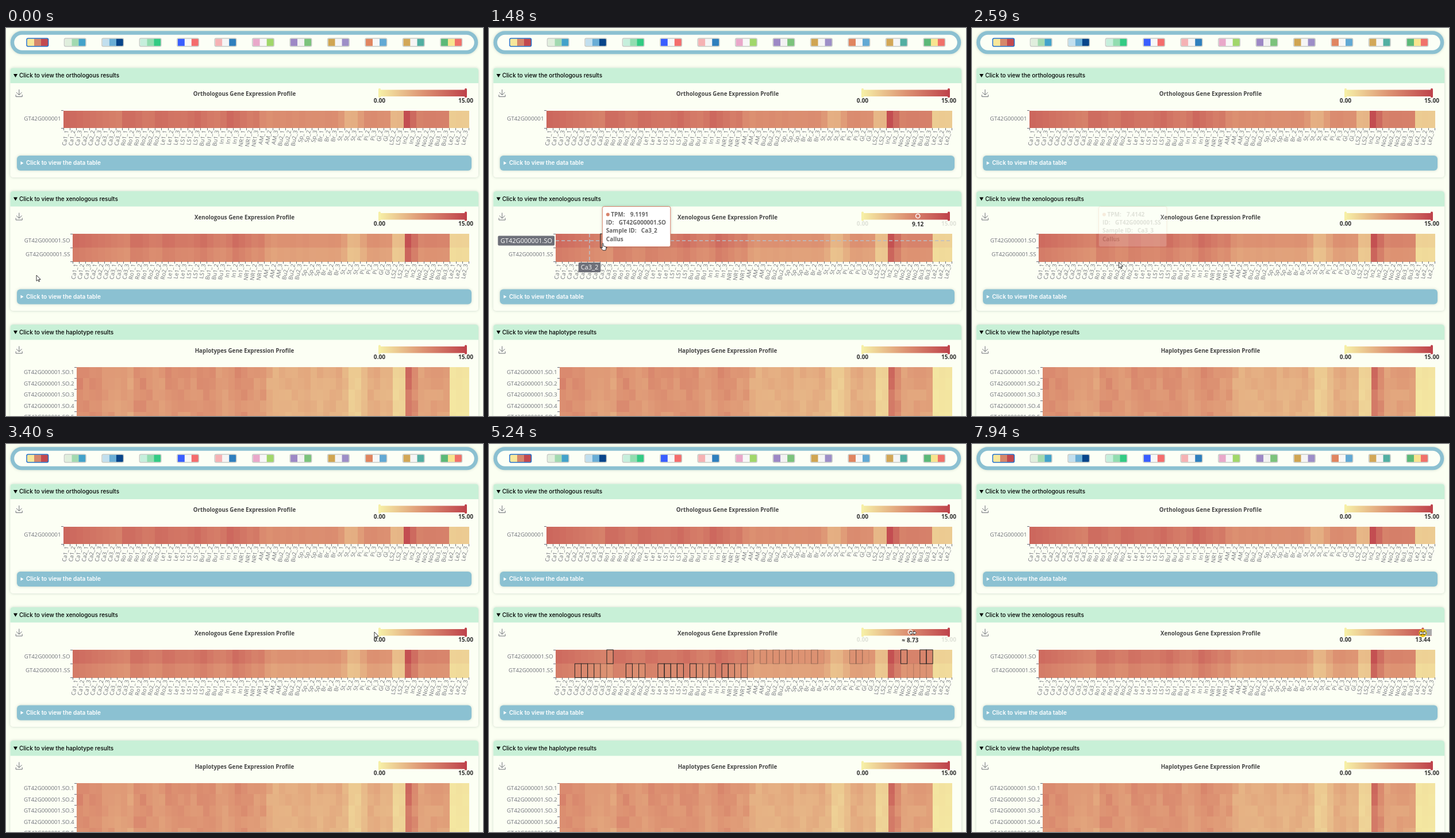
An HTML page that plays this animation: 830 px wide and 675 px high, repeating every 8 s.

```html
<!DOCTYPE html>
<html lang="en">
<head>
<meta charset="utf-8">
<title>Gene expression profiles</title>
<style>
  html, body { margin: 0; width: 100%; height: 100%; overflow: hidden; background: #fbfff2; }
  svg { display: block; width: 100%; height: 100%; }
  text { font-family: "Open Sans", "Noto Sans", sans-serif; white-space: pre; }
  .head { font: 500 10px Inter, sans-serif; fill: #000; }
  .bar { font: 600 10px Inter, sans-serif; fill: #fff; }
  .title { font-size: 9.8px; font-weight: 700; fill: #464646; text-anchor: middle; }
  .axis { font-size: 9.75px; fill: #6e7079; text-anchor: end; }
  .scale { font-size: 10.2px; font-weight: 700; fill: #333; text-anchor: middle; }
  .tag { font-size: 11px; fill: #fff; }
  .tip { font-size: 10px; font-weight: 700; fill: #666; }
  .tick { stroke: #6e7079; stroke-width: 1; fill: none; }
  .crisp { shape-rendering: crispEdges; }
</style>
</head>
<body>
<svg viewBox="0 0 830 675" xmlns="http://www.w3.org/2000/svg">
  <defs>
    <linearGradient id="ramp">
      <stop offset="0" stop-color="#f6efa6"/><stop offset=".5" stop-color="#dd9373"/><stop offset="1" stop-color="#bf444c"/>
    </linearGradient>
    <filter id="soft" x="-10%" y="-30%" width="120%" height="160%">
      <feDropShadow dx="0" dy="0" stdDeviation="2.2" flood-color="#576" flood-opacity=".32"/>
    </filter>
  </defs>
  <g id="page"></g>
  <g id="live"></g>
</svg>
<script>
const LOOP = 8000, RIGHT = 805.5, MAX = 15, BAR0 = 650, BARW = 150;

// tissue names with their replicate numbers
const samples = [
  'Ca1 Ca2 Ca3 Ro1 Ro2 Le1 LS1 Bu1 In1 NR1 AM Bu2 Sp Br St Pi:123', 'Gl:23', 'LS2:23', 'In2:13', 'No2:123', 'Bu3:13', 'Le2:123'
].flatMap(s => {
  const [names, reps] = s.split(':');
  return names.split(' ').flatMap(n => [...reps].map(r => n + '_' + r));
});
const COLS = samples.length;

const noise = (r, c) => { const v = Math.sin(r * 78.23 + c * 12.99) * 43758.5; return v - Math.floor(v) - .5; };

// expression model: falling callus, rippled roots and leaves, a stem dip, then one level per late tissue
function level(c) {
  if (c < 30) return 10.2 + .035 * c * Math.cos((c - 20) * 1.19);
  if (c < 50) return 7.6 - 3.35 * Math.exp(-((c - 43.5) ** 2) / 2);
  return { LS2: 4.2, In2: 13.3 - 1.9 * (c - 52), No2: 9, Bu3: 9, Le2: 2.4 }[samples[c].slice(0, 3)];
}
const tpm = samples.map((_, c) => c < 9 ? 11.3143 - .3136 * c : level(c) * (1 + noise(0, c) * .08));
const ortho = [tpm.map(v => v * .98 + .6)];
const xeno = [tpm, tpm.map(v => v * .9 - .51075)];
const haplo = [1, 2, 3, 4, 5].map(r => tpm.map((v, c) => v * (.89 - .015 * r + noise(r, c) * .14) - 1.2));

const mix = (a, b, t) => a.map((v, i) => Math.round(v + (b[i] - v) * t));
const stops = [[246, 239, 166], [221, 147, 115], [191, 68, 76]];
const heat = v => {
  const t = clamp(v / MAX, 0, 1) * 2;
  return `rgb(${t < 1 ? mix(stops[0], stops[1], t) : mix(stops[1], stops[2], t - 1)})`;
};

const rect = (x, y, w, h, fill, more = '') => `<rect x="${x}" y="${y}" width="${w}" height="${h}" fill="${fill}" ${more}/>`;
const text = (cls, x, y, s, more = '') => `<text class="${cls}" x="${x}" y="${y}" ${more}>${s}</text>`;
const handle = (x, y, v) => rect(x - 2, y - 8, 4, 16, heat(v), 'rx="1.5"');
function clamp(v, a, b) { return Math.max(a, Math.min(b, v)); }

function paletteBar() {
  const sets = [
    'f8e79b d6876b c2494f', 'e0eedd a2d9b0 43a2ca', 'c2dfee 6aaed6 08458a', 'c6efdc 92ddb0 33cb83',
    '3a5eff f7f7f7 f46d6d', 'f5b2b4 f5f5f5 2f7fbe', 'e9a8ca f7f7f7 a1d76a', '9d88c5 f2f2f2 7cc37c',
    'd0a552 f5f5f5 9d8ec7', 'e08560 f7f7f7 62a9d4', 'd2a757 f5f5f5 52afa2', '5cb978 f8e48f f0716a'
  ];
  return rect(11, 8.5, 807, 33.5, '#fcfff6', 'rx="16.7" stroke="#8bc0d1" stroke-width="6.5" filter="url(#soft)"') +
    sets.map((s, i) => {
      const x = 36 + i * 65.45;
      return s.split(' ').map((c, k) => rect(x + 1 + k * 12, 18.5, 12.2, 13, '#' + c)).join('') +
        rect(x, 18, 37.6, 14, 'none', `rx="2.5" stroke-width="1.5" stroke="${i ? '#c8ccc8' : '#2470c8'}"`);
    }).join('');
}

function card(y, height, kind, title) {
  return rect(7.5, y, 814.5, height, '#fcfff4', 'rx="5" filter="url(#soft)"') +
    `<path d="M7.5 ${y + 26.5}V${y + 5}q0-5 5-5H817q5 0 5 5V${y + 26.5}z" fill="#c8f0d7"/>` +
    `<path d="M13 ${y + 10.5}h7l-3.5 6z"/>` +
    text('head', 23, y + 16.5, `Click to view the ${kind} results`) +
    `<path class="tick" d="M18 ${y + 42.5}l4.8 4.5 4.8-4.5M17.2 ${y + 46.5}v3.5h11v-3.5M22.8 ${y + 47}v-9.5"/>` +
    text('title', 415, y + 48.5, title + ' Gene Expression Profile') +
    rect(BAR0, y + 38, BARW, 11.5, 'url(#ramp)') + handle(BAR0, y + 43.5, 0);
}

const scaleEnds = y => handle(800, y + 43.5, MAX) + text('scale', 650, y + 60, '0.00') + text('scale', 800, y + 60, '15.00');

function chart(rows, x0, y0, rowH, names, labelled = true) {
  const w = (RIGHT - x0) / COLS, end = y0 + rowH * rows.length;
  let out = '<g class="crisp">';
  rows.forEach((row, r) => row.forEach((v, c) => out += rect(x0 + c * w, y0 + r * rowH, w + .3, rowH + .2, heat(v))));
  let ticks = '';
  for (let r = 0; r <= rows.length; r++) ticks += `M${x0 - 4} ${y0 + r * rowH}h4`;
  if (labelled) for (let c = 0; c <= COLS; c++) ticks += `M${x0 + c * w} ${end}v4`;
  out += `<path class="tick" d="${ticks}"/></g>`;
  rows.forEach((_, r) => out += text('axis', x0 - 4.5, y0 + (r + .5) * rowH + 2.7, names[r]));
  if (labelled) samples.forEach((s, c) =>
    out += text('axis', 0, 3.4, s, `transform="translate(${x0 + (c + .5) * w} ${end + 4}) rotate(-80)"`));
  return out;
}

const tableBar = y => rect(19, y, 791, 26, '#8bc1d2', 'rx="6" filter="url(#soft)"') +
  `<path d="M25.5 ${y + 10}v6l5-3z" fill="#fff"/>` + text('bar', 35, y + 16.2, 'Click to view the data table');

const X0 = 116, Y0 = 358, ROW = 24.2, CW = (RIGHT - X0) / COLS;
const gene = 'GT42G000001', xenoNames = [gene + '.SO', gene + '.SS'];
document.getElementById('page').innerHTML =
  paletteBar() +
  card(69.5, 190.5, 'orthologous', 'Orthologous') + scaleEnds(69.5) +
  chart(ortho, 100, 143.5, 30.5, [gene]) + tableBar(222) +
  card(284, 208, 'xenologous', 'Xenologous') +
  chart(xeno, X0, Y0, ROW, xenoNames) + tableBar(454.5) +
  card(516, 200, 'haplotype', 'Haplotypes') + scaleEnds(516) +
  chart(haplo, 123, 590, 19.4, haplo.map((_, i) => `${gene}.SO.${i + 1}`), false);

// pointer key points: time, x, y
const track = [
  [60, 53, 430], [680, 118, 374], [1340, 160, 372], [1450, 198, 374], [1700, 199, 380], [1900, 210, 392],
  [2480, 211, 406], [3150, 480, 414], [3350, 641, 327], [3450, 641, 327], [4380, 687.2, 328],
  [6070, 785.6, 329], [6520, 800, 329], [7460, 800, 329], [7940, 784.4, 329]
];
function pointer(t) {
  const i = clamp(track.findIndex(k => k[0] > t), -1, track.length);
  if (i < 0) return track[track.length - 1].slice(1);
  const [t1, ...b] = track[i], [t0, ...a] = track[Math.max(0, i - 1)];
  const p = i ? (t - t0) / (t1 - t0) : 0;
  return a.map((v, k) => v + (b[k] - v) * p);
}
// trailing mean gives the eased follow of the overlays
function trail(f, t, span) {
  let sum = 0;
  for (let i = 0; i < 10; i++) sum += f(t - span * i / 9);
  return sum / 10;
}

const IN = 680, OUT = 2440, BAR_IN = 3540, BAR_OUT = 7010, PRESS = 7260, DRAG = 7460;
const cellAt = t => {
  const [x, y] = pointer(clamp(t, IN, OUT));
  return [clamp(Math.floor((x - X0) / CW), 0, COLS - 1), y < Y0 + ROW ? 0 : 1];
};
const valueAt = t => { const [c, r] = cellAt(t); return xeno[r][c]; };
const barValue = t => clamp((pointer(t)[0] - BAR0) / BARW * MAX, 0, MAX);
const box = (c, r, o) => rect(X0 + c * CW, Y0 + r * ROW, CW, ROW, 'none', `stroke="#222" opacity="${o}"`);

function indicator(x, label) {
  return `<circle cx="${x}" cy="327" r="3.6" fill="${heat((x - BAR0) / BARW * MAX)}" stroke="#fff" stroke-width="1.5"/>` +
    text('scale', x, 345, label);
}

function heatHover(t) {
  const [c, r] = cellAt(t);
  const x = trail(u => X0 + (cellAt(u)[0] + .5) * CW, t, 200);
  const y = trail(u => Y0 + (cellAt(u)[1] + .5) * ROW, t, 100);
  const left = 15.5 + 2.5 * r;
  return box(c, r, 1) +
    `<path d="M${X0} ${y}H${RIGHT}M${x} ${Y0}v${ROW * 2}" stroke="#b9bec9" stroke-width="1.5" stroke-dasharray="6 4"/>` +
    rect(left, y - 8.5, 114 - left, 17, '#6e7079', 'rx="2"') +
    text('tag', 110, y + 3.6, xenoNames[r], 'text-anchor="end"') +
    rect(x - 19.3, 408, 38.6, 17, '#6e7079', 'rx="2"') +
    text('tag', x, 419.5, samples[c], 'text-anchor="middle"') +
    indicator(BAR0 + trail(valueAt, t, 150) / MAX * BARW, valueAt(t).toFixed(2));
}

function tooltip(t) {
  const [c, r] = cellAt(t), v = xeno[r][c];
  const x = trail(u => pointer(clamp(u, IN, OUT))[0], t, 110) + 9.5;
  const o = clamp((t - IN) / 150, 0, 1) * clamp((2620 - t) / 160, 0, 1);
  const rows = [['TPM:', 48.5, v.toFixed(4)], ['ID:', 28.5, xenoNames[r]], ['Sample ID:', 67.5, samples[c]], ['Callus', 0, '']];
  return `<g opacity="${o}">` +
    rect(x, 310.5, 118.5, 70, '#fff', `rx="3" stroke="${heat(v)}" filter="url(#soft)"`) +
    `<circle cx="${x + 9.5}" cy="324.5" r="3" fill="${heat(v)}"/>` +
    rows.map(([key, dx, val], i) => {
      const y = 327.7 + i * 14.3;
      return text('tip', x + (i ? 6.5 : 15), y, key) + text('tip', x + dx, y, val);
    }).join('') + '</g>';
}

function barHover(t) {
  let out = '';
  xeno.forEach((row, r) => row.forEach((q, c) => {
    for (let k = 0; k < 5; k++) {
      const u = t - k * 45;
      if (u >= BAR_IN && Math.abs(q - barValue(u)) < .28) { out += box(c, r, 1 - k * .22); break; }
    }
  }));
  const x = BAR0 + trail(barValue, t, 150) / MAX * BARW;
  return out + indicator(x, '≈ ' + barValue(t).toFixed(2));
}

const shapes = {
  arrow: 'M0 0v10.2l2.5-2.2 1.6 3.4 1.4-.7-1.5-3.3h3.2z',
  hand: 'M-1 .5q1-1.4 2 0v4.2l3.8 1q1.4.5 1 2l-.8 4.3h-5L-3 8.3q-.6-1.5.8-1.3L-1 8z',
  resize: 'M-6 0l3.5-3.5v2.2h5v-2.2L6 0 2.5 3.5V1.3h-5v2.2z'
};
const cursor = (kind, x, y) => `<path transform="translate(${x} ${y})" d="${shapes[kind]}" fill="#fff" stroke="#222" stroke-width=".9" stroke-linejoin="round"/>`;

const live = document.getElementById('live');
function draw(t) {
  const [x, y] = pointer(t);
  const onHeat = t >= IN && t < OUT, onBar = t >= BAR_IN && t < BAR_OUT;
  const faint = `opacity="${onHeat || onBar ? .14 : 1}"`;
  const hx = t >= DRAG ? x : 800, top = (hx - BAR0) / BARW * MAX;
  let out = rect(hx, 322, 800 - hx, 11.5, '#aaa', 'rx="1"') + handle(hx, 327.5, top) +
    text('scale', 650, 344, '0.00', faint) + text('scale', hx, 344, top.toFixed(2), faint);
  if (onHeat) out += heatHover(t);
  if (t >= IN && t < 2620) out += tooltip(t);
  if (onBar) out += barHover(t);
  if (t >= PRESS) out += `<circle cx="${x}" cy="${y}" r="7" fill="#f5d800" opacity=".75"/>`;
  live.innerHTML = out + cursor(onHeat ? 'hand' : t >= BAR_IN ? 'resize' : 'arrow', x, y);
}

function tick() {
  draw(performance.now() % LOOP);
  requestAnimationFrame(tick);
}
tick();
</script>
</body>
</html>
```
